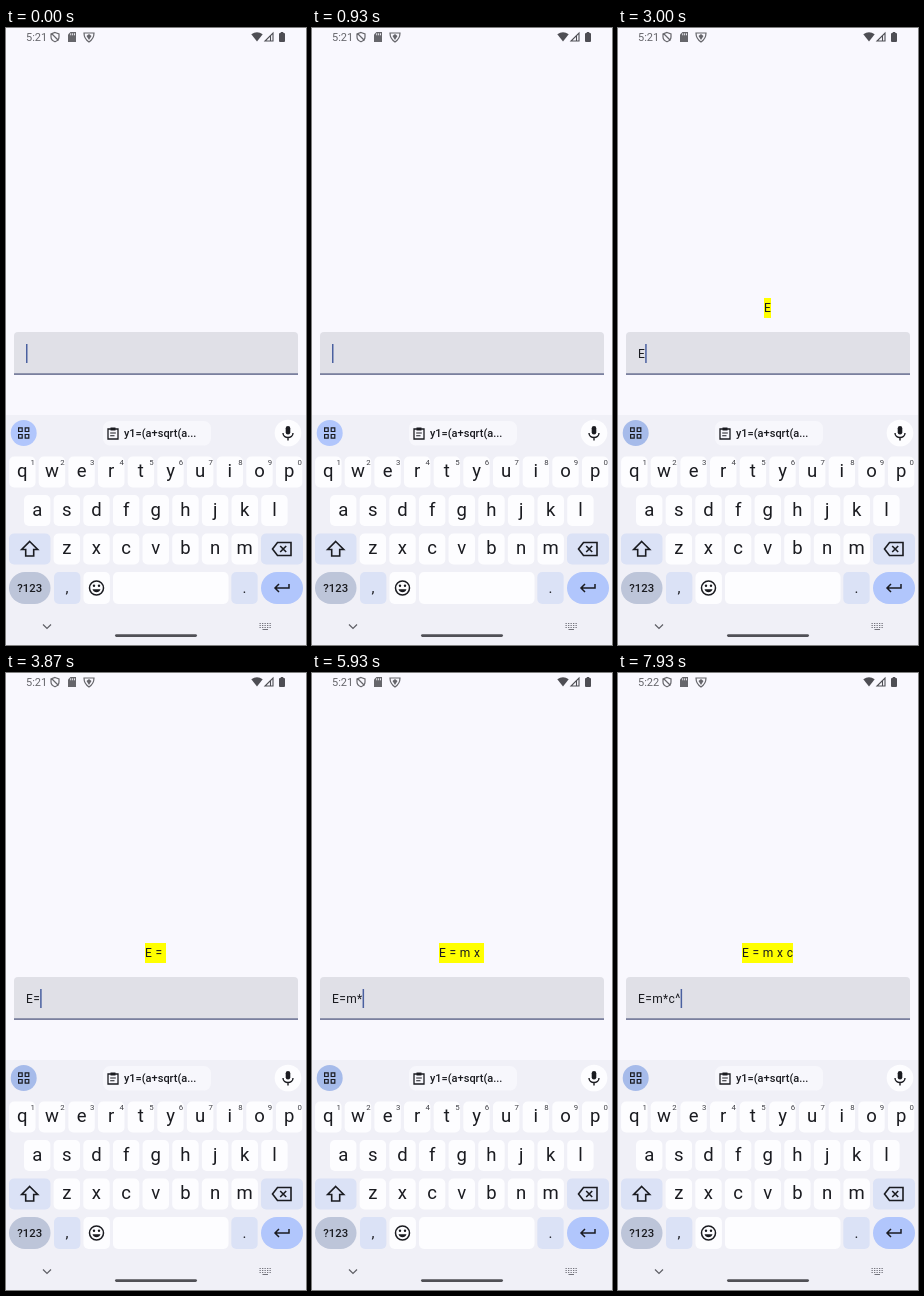
Recreate the animation shown at these times as an HTML page with a canvas. Size 300 px wide and 617 px high, loop 8 s.

```html
<!DOCTYPE html>
<html lang="en">
<head>
<meta charset="utf-8">
<title>Formula input</title>
<style>
html, body { margin: 0; width: 100%; height: 100%; overflow: hidden; background: #f9f8fe; }
canvas { display: block; width: 100vw; height: 100vh; }
</style>
</head>
<body>
<canvas id="stage"></canvas>
<script>
const W = 300, H = 617, LOOP = 8000;
const canvas = document.getElementById('stage');
const ctx = canvas.getContext('2d');
const INK = '#1a1b20';
const FONT = 'Roboto, sans-serif';

const colors = {
  page: '#f9f8fe', board: '#f0f0f7', field: '#e0e0e7', line: '#5c6488', key: '#fdfdff',
  chip: '#f7f7fc', soft: '#dbe2f6', mode: '#bdc5d9', enter: '#b1c6fc', caret: '#4a60a0'
};

// Time of each keystroke, the typed text and the formatted formula.
const steps = [
  [2870, 'E', 'E'],
  [3530, 'E=', 'E = '],
  [4670, 'E=m', 'E = m'],
  [5600, 'E=m*', 'E = m x '],
  [6200, 'E=m*c', 'E = m x c'],
  [7470, 'E=m*c^', 'E = m x c']
];

function box(x, y, w, h, r, color) {
  ctx.fillStyle = color;
  ctx.beginPath();
  ctx.roundRect(x, y, w, h, r);
  ctx.fill();
}

function disc(x, y, r, color) {
  ctx.fillStyle = color;
  ctx.beginPath();
  ctx.arc(x, y, r, 0, 7);
  ctx.fill();
}

function text(str, x, y, size, { align = 'left', color = INK, weight = 400, spacing = 0 } = {}) {
  ctx.font = `${weight} ${size}px ${FONT}`;
  ctx.letterSpacing = spacing + 'px';
  ctx.textAlign = align;
  ctx.fillStyle = color;
  ctx.fillText(str, x, y);
  const width = ctx.measureText(str).width;
  ctx.letterSpacing = '0px';
  return width;
}

// Draws an SVG path around the point x, y.
function icon(d, x, y, { fill, stroke = INK, width = 1.5 } = {}) {
  ctx.save();
  ctx.translate(x, y);
  const path = new Path2D(d);
  if (fill) {
    ctx.fillStyle = fill;
    ctx.fill(path);
  } else {
    ctx.strokeStyle = stroke;
    ctx.lineWidth = width;
    ctx.stroke(path);
  }
  ctx.restore();
}

function statusBar(t) {
  const grey = '#66666b', dark = '#4e4e54';
  const shield = 'M0-4.5L4-3V0C4 2.4 2 4 0 4.8C-2 4-4 2.4-4 0V-3Z';
  text(t < 7870 ? '5:21' : '5:22', 20, 13, 11, { color: grey });
  icon(shield + 'M-3.5-3.5L3.5 3.5', 49, 9, { stroke: grey, width: 1.2 });
  icon('M-1.5-5H4V5H-4V-2.5Z', 66, 9, { fill: grey });
  ctx.fillStyle = colors.page;
  for (let i = 0; i < 3; i++) ctx.fillRect(64.3 + i * 1.9, 5.3, 0.9, 2);
  icon('M-5-4H5C5 0 3 3 0 5C-3 3-5 0-5-4Z', 83, 9, { stroke: grey, width: 1.2 });
  icon('M0-3L2.5-1L0 3L-2.5-1Z', 83, 9, { fill: grey });
  icon('M-5.7-2.8Q0-6.8 5.7-2.8L0 4.5Z', 251, 9, { fill: dark });
  icon('M4-4V4H-4ZM1.5-1.5V4', 263, 9, { stroke: dark, width: 1.1 });
  box(273, 5, 6, 9, 1, dark);
  ctx.fillRect(274.7, 4, 2.6, 1);
}

function inputField(t) {
  const step = steps.findLast(s => t >= s[0]);
  box(8, 304, 284, 42, [4, 4, 0, 0], colors.field);
  ctx.fillStyle = colors.line;
  ctx.fillRect(8, 345.4, 284, 1.4);

  const style = { spacing: 0.37 };
  let caretX = 20;
  if (step) {
    const [, typed, formula] = step;
    ctx.font = `400 12px ${FONT}`;
    ctx.letterSpacing = style.spacing + 'px';
    const w = Math.round(ctx.measureText(formula).width);
    const x = Math.floor(150 - w / 2);
    ctx.fillStyle = '#ffff00';
    ctx.fillRect(x, 270, w, 20);
    text(formula, x, 284, 12, style);
    caretX += text(typed, 20, 329.5, 12, style);
  }
  const since = step ? t - step[0] : t + 200;
  if (since % 1000 < 500) {
    ctx.fillStyle = colors.caret;
    ctx.fillRect(caretX, 316, 1.5, 19);
  }
}

function toolbar(t) {
  disc(17.7, 405, 13, t < 2870 ? '#b1c6fc' : '#a6bbea');
  for (const dx of [-4, 2.6])
    for (const dy of [-4, 2.6])
      icon('M-1.8-1.8H1.8V1.8H-1.8Z', 18.4 + dx, 405.7 + dy, { width: 1.2 });

  box(97, 393, 108, 24.5, 7, colors.chip);
  icon('M-5-4H5V6H-5Z', 107, 405, { width: 1.3 });
  icon('M-2.5-5.5H2.5V-2.5H-2.5Z', 107, 405, { fill: INK });
  icon('M-2.8 0H2.8M-2.8 2.8H1.5', 107, 405, { width: 1.1 });
  text('y1=(a+sqrt(a...', 118, 409, 11, { weight: 500 });

  disc(282, 405, 13.3, colors.key);
  box(279.7, 398, 4.6, 8.6, 2.3, INK);
  icon('M-5 0C-5 6 5 6 5 0M0 4.5V7.5', 282, 405, { width: 1.4 });
}

function letterKey(ch, x, y) {
  box(x - 13.2, y, 26.4, 31, 5, colors.key);
  text(ch, x, y + 20.5, 18.5, { align: 'center' });
}

function keyboard() {
  const { key, soft, mode, enter } = colors;
  [...'qwertyuiop'].forEach((ch, i) => {
    const x = 16.3 + i * 29.65;
    letterKey(ch, x, 428.5);
    text(String((i + 1) % 10), x + 10.5, 437, 7.8, { align: 'center', color: '#404147' });
  });
  [...'asdfghjkl'].forEach((ch, i) => letterKey(ch, 31.2 + i * 29.65, 467));
  [...'zxcvbnm'].forEach((ch, i) => letterKey(ch, 60.8 + i * 29.65, 505.5));

  box(3, 505.5, 41.5, 31, 5, soft);
  icon('M0-7.5L8 .5H4V7H-4V.5H-8Z', 23.7, 521, { width: 1.6 });
  box(255, 505.5, 42, 31, 5, soft);
  icon('M-9.5 0L-4.5-6.5H9V6.5H-4.5ZM-1.8-3L4.2 3M4.2-3L-1.8 3', 276, 521, { width: 1.6 });

  const y = 544;
  box(3, y, 41.5, 32, 16, mode);
  text('?123', 23.7, y + 20, 11.3, { align: 'center', weight: 500 });
  box(48, y, 26.4, 32, 5, soft);
  text(',', 61, y + 20.5, 15, { align: 'center' });
  box(77.5, y, 26.4, 32, 5, key);
  icon('M7 0A7 7 0 1 1-7 0A7 7 0 1 1 7 0', 90.5, 560, { width: 1.5 });
  icon('M-4 1.2H4C3 5.2-3 5.2-4 1.2Z', 90.5, 560, { fill: INK });
  disc(88, 557.8, 1.2, INK);
  disc(93, 557.8, 1.2, INK);
  box(107, y, 115.5, 32, 5, key);
  box(225.3, y, 26.4, 32, 5, soft);
  text('.', 238.5, y + 20.5, 15, { align: 'center' });
  box(255, y, 42, 32, 16, enter);
  icon('M7-4V0H-6.5M-3-4L-7 0L-3 4', 276, 560, { width: 1.5 });
}

function navBar() {
  icon('M-4-2L0 2L4-2', 41, 598.5, { stroke: '#5e5f66', width: 1.2 });
  box(109, 606.2, 82, 2.8, 1.4, '#505056');
  ctx.fillStyle = '#74747c';
  for (let row = 0; row < 3; row++)
    for (let i = 0; i < 5; i++) ctx.fillRect(253.5 + i * 2.5, 595 + row * 2, 1.3, 1);
  ctx.fillRect(256.5, 601, 5.5, 1);
}

function draw(t) {
  ctx.fillStyle = colors.page;
  ctx.fillRect(0, 0, W, H);
  ctx.fillStyle = colors.board;
  ctx.fillRect(0, 387, W, H - 387);
  statusBar(t);
  inputField(t);
  toolbar(t);
  keyboard();
  navBar();
}

function fit() {
  const dpr = window.devicePixelRatio || 1;
  canvas.width = Math.round(innerWidth * dpr);
  canvas.height = Math.round(innerHeight * dpr);
  ctx.setTransform(canvas.width / W, 0, 0, canvas.height / H, 0, 0);
}

const start = performance.now();
function frame() {
  draw((performance.now() - start) % LOOP);
  requestAnimationFrame(frame);
}
addEventListener('resize', fit);
fit();
frame();
</script>
</body>
</html>
```
